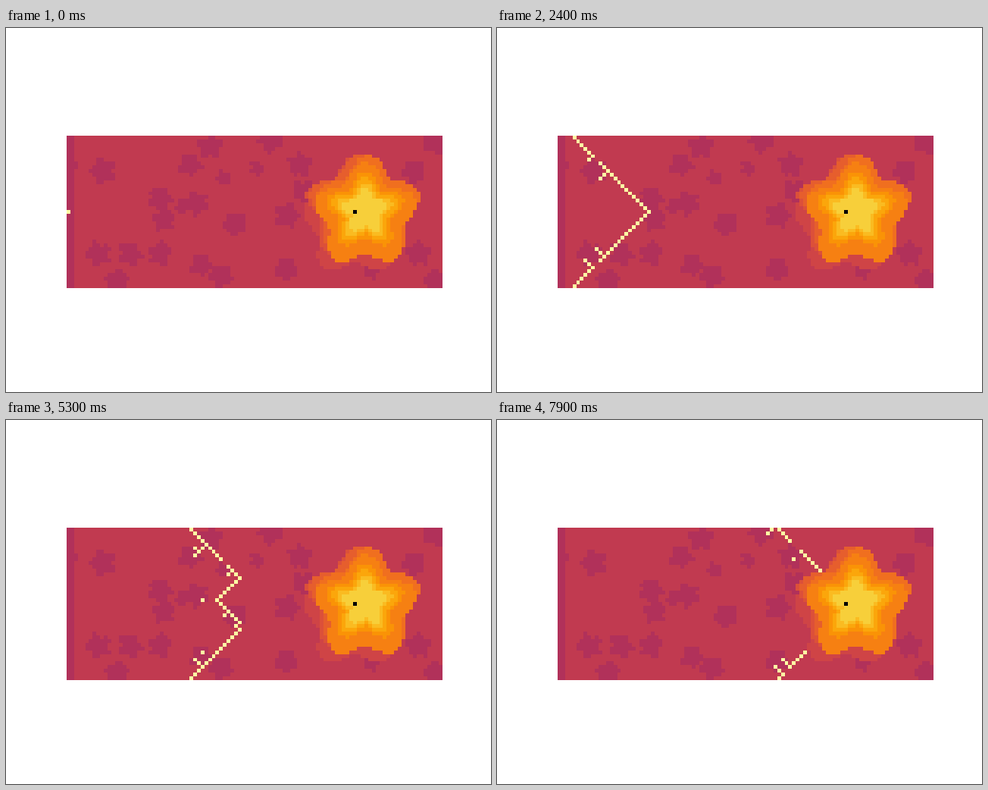
Recreate the animation shown at these times as a matplotlib script. Size 640 by 480 pixels, loop 8 s.

```python
import numpy as np
import matplotlib.pyplot as plt
from matplotlib.animation import FuncAnimation

WIDTH, HEIGHT = 640, 480
LEFT, TOP, W, H = 80, 142, 496, 201
ROWS, COLS, FRAMES = 41, 101, 80
FLAT, STEP = 0.517, 0.041

# cell centres in stage pixels
px, py = np.meshgrid(LEFT + W / COLS * (np.arange(COLS) + 0.5),
                     TOP + H / ROWS * (np.arange(ROWS) + 0.5))


def star(x, y, r, amp, turn=0.0):
    """Mask of a soft five-armed star."""
    ang = np.arctan2(py - y, px - x) + np.pi / 2
    return np.hypot(px - x, py - y) <= r + amp * np.cos(5 * (ang + turn))


# hollow centres by size
HOLLOWS = {
    17: [(128, 189), (122, 298), (164, 298), (203, 297), (146, 334),
         (203, 225), (208, 252), (252, 231), (302, 259), (258, 312),
         (283, 327), (370, 318), (371, 247), (393, 216), (388, 180),
         (243, 180), (270, 156), (350, 148), (538, 190), (566, 150),
         (545, 297), (566, 335)],
    11: [(232, 236), (286, 197), (331, 185), (482, 322)],
}
# centres of the five wide layers of the hill, lowest first
WIDE = [(460, 260), (463, 238), (468, 236), (478, 238), (474, 248)]


def make_ground():
    hollow = np.zeros((ROWS, COLS), bool)
    for size, centres in HOLLOWS.items():
        for x, y in centres:
            hollow |= star(x, y, 0.86 * size, 0.16 * size, x + y)
    hollow[7:9, 2] = True
    ground = np.where(hollow, FLAT - STEP, FLAT)
    ground[:, :2] = FLAT - STEP

    layers = [star(x, y, 60, 10) for x, y in WIDE]
    layers += [star(474, 242, 44 - 6.5 * k, 9 - k) for k in range(4)]
    for k, mask in enumerate(layers, 1):
        ground[mask] = FLAT + STEP * k
    hill = ground > FLAT
    ground[20, 77] = 0
    return ground, hollow & ~hill, hill


def near(m):
    """Cells with one of their four neighbours in m."""
    p = np.pad(m, 1)
    return p[:-2, 1:-1] | p[2:, 1:-1] | p[1:-1, :-2] | p[1:-1, 2:]


def spread_wave(hollow, hill):
    """Wave that falls into hollows, cannot leave them or climb the hill."""
    lit = np.zeros((ROWS, COLS), bool)
    lit[20, 0] = True
    seen, entry = lit.copy(), np.zeros_like(lit)
    last = np.where(lit, 0, -99)
    waves = [lit]
    for t in range(1, FRAMES):
        from_flat = near(lit & ~hollow)
        first = ~seen & ~hill & (from_flat | near(lit & hollow) & hollow)
        ripple = hollow & seen & near(entry) & (t - last >= 3)
        entry = hollow & seen & from_flat & ~lit
        lit = first | entry | ripple
        seen = seen | lit
        last[lit] = t
        waves.append(lit)
    return waves


ground, hollow, hill = make_ground()
waves = spread_wave(hollow, hill)

fig = plt.figure(figsize=(WIDTH / 100, HEIGHT / 100), dpi=100)
ax = fig.add_axes([LEFT / WIDTH, 1 - (TOP + H) / HEIGHT,
                   W / WIDTH, H / HEIGHT])
ax.axis("off")
image = ax.imshow(ground, cmap="inferno", vmin=0, vmax=1,
                  interpolation="nearest", aspect="auto")


def draw(i):
    image.set_data(np.where(waves[i], 1.0, ground))
    return [image]


anim = FuncAnimation(fig, draw, frames=FRAMES, interval=100,
                     repeat=True, repeat_delay=0)
plt.show()
```
